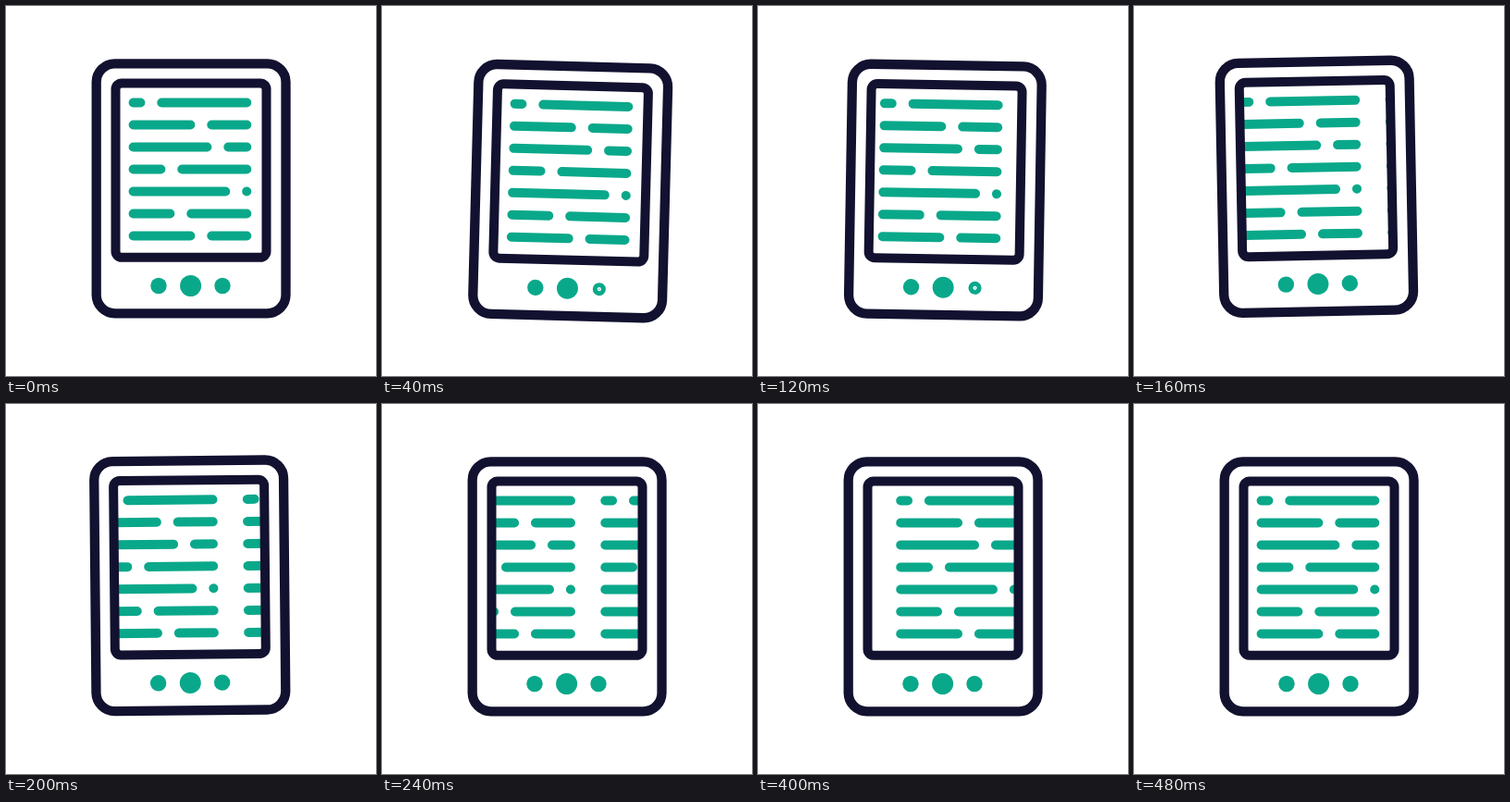
Animation, 400 px wide and 400 px high, one loop 520 ms. Source, as an HTML page:

```html
<!DOCTYPE html>
<html lang="en">
<head>
<meta charset="utf-8">
<title>E-reader</title>
<style>
  html, body { margin: 0; height: 100%; overflow: hidden; background: #fff; }
  svg { display: block; width: 100%; height: 100%; }
  .frame { fill: none; stroke: #12112f; }
  .line, #ring { fill: none; stroke: #0aa88a; }
  .line { stroke-width: 10; stroke-linecap: round; }
  .dot { fill: #0aa88a; }
</style>
</head>
<body>
<svg viewBox="0 0 400 400">
  <defs>
    <clipPath id="screen"><rect x="120" y="85" width="160" height="185"/></clipPath>
    <path id="page" class="line"/>
  </defs>
  <g id="device">
    <g clip-path="url(#screen)">
      <g id="pages">
        <use href="#page"/>
        <use href="#page" x="160"/>
      </g>
    </g>
    <rect class="frame" x="97.7" y="62.3" width="204.8" height="270" rx="20" stroke-width="10.3"/>
    <rect class="frame" x="118.5" y="83.4" width="163" height="188.4" rx="6.5" stroke-width="10"/>
    <circle class="dot" cx="165" cy="302.5" r="8.7"/>
    <circle class="dot" cx="199.6" cy="302.5" r="11.5"/>
    <circle class="dot" cx="234" cy="302.5" r=".7"/>
    <circle id="ring" cx="234" cy="302.5"/>
  </g>
</svg>
<script>
const LOOP = 520, STEP = 40, PAGE = 160;
const $ = id => document.getElementById(id);

// Each text row is split by one gap; the values are where the first part ends.
const breaks = [145.4, 199.4, 217.4, 167.4, 237.3, 177.4, 199.4];
$('page').setAttribute('d', breaks.map((x, i) =>
  `M137.6 ${104.5 + 24 * i}H${x}m22.9 0H260.3`).join(''));

// Smooth progress from time a to time b
const ease = (t, a, b) => {
  const u = Math.min(1, Math.max(0, (t - a) / (b - a)));
  return u * u * (3 - 2 * u);
};

function draw(now) {
  const t = Math.floor(now % LOOP / STEP) * STEP;
  const tilt = 3 * ease(t, 0, 80) - 4.1 * ease(t, 80, 160) + 1.1 * ease(t, 160, 240);
  const press = ease(t, 0, 80) - ease(t, 80, 160);
  $('device').setAttribute('transform', `rotate(${tilt} 94 336)`);
  $('pages').setAttribute('transform', `translate(${-PAGE * ease(t, 80, 480)})`);
  $('ring').setAttribute('r', 4.35 + 0.45 * press);
  $('ring').setAttribute('stroke-width', 8.7 - 7.5 * press);
  requestAnimationFrame(draw);
}
draw(0);
</script>
</body>
</html>
```
